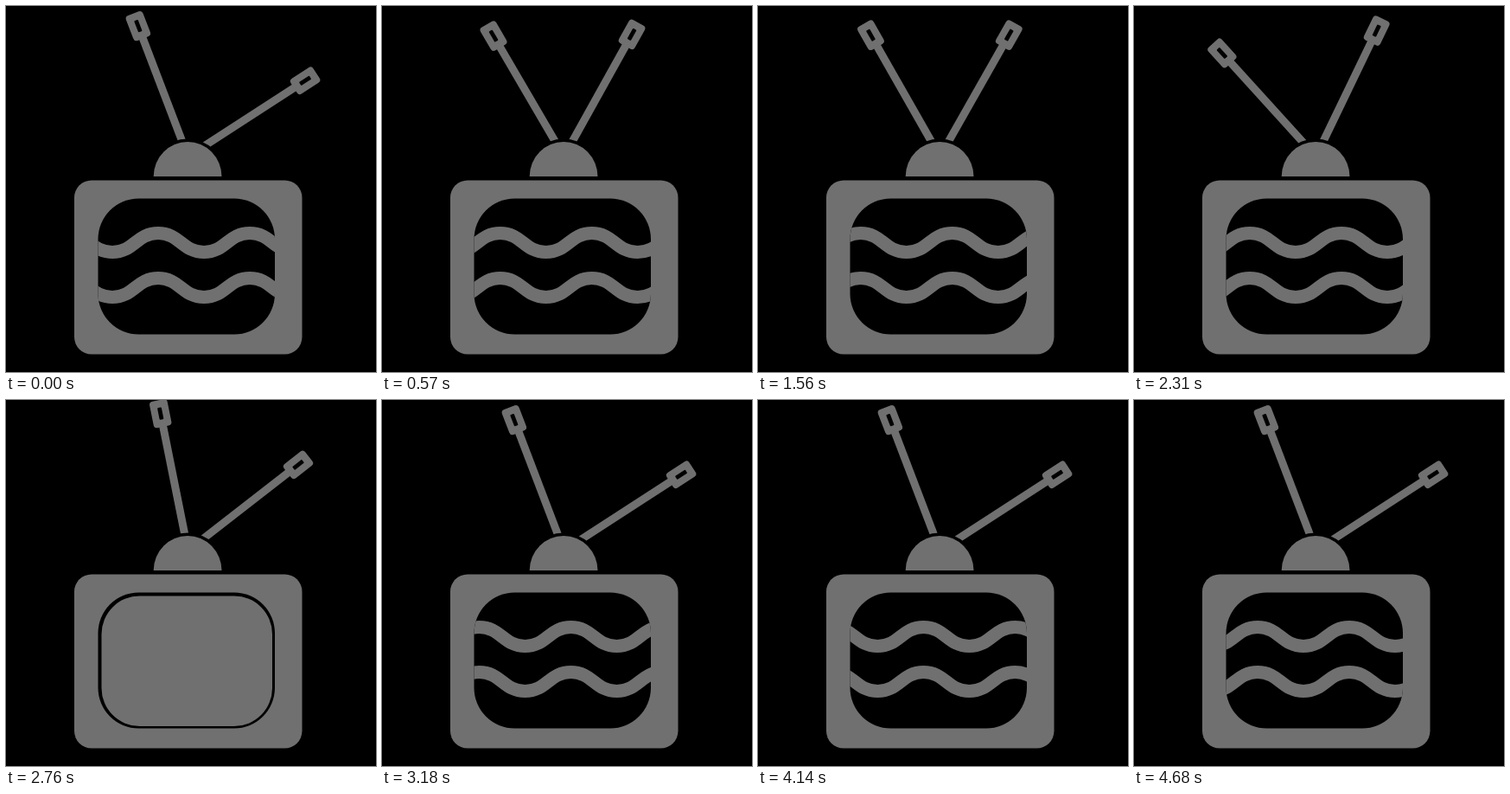
Write an HTML page that moves like this. It is 428x423 px and loops after 4710 ms.

```html
<!DOCTYPE html>
<html lang="en">
<head>
<meta charset="utf-8">
<title>Television</title>
<style>
html, body { margin: 0; width: 100%; height: 100%; overflow: hidden; background: #000; }
svg { display: block; width: 100vw; height: 100vh; }
</style>
</head>
<body>
<svg viewBox="0 0 428 423" fill="#707070">
  <defs>
    <clipPath id="glass"><rect x="106.5" y="222.5" width="204.5" height="157" rx="47"/></clipPath>
    <g id="rod">
      <rect x="-4.5" y="-150" width="9" height="150"/>
      <rect x="-10.5" y="-177" width="21" height="31" rx="4"/>
      <rect x="-2.4" y="-168.5" width="4.8" height="14" rx="1" fill="#000"/>
    </g>
  </defs>
  <rect width="428" height="423" fill="#000"/>
  <use id="left" href="#rod"/>
  <use id="right" href="#rod"/>
  <circle cx="210" cy="196.5" r="43" fill="#000"/>
  <path d="M170.7 197a39.4 40 0 0 1 78.8 0z"/>
  <rect x="79" y="197" width="263" height="20" fill="#000"/>
  <rect x="79" y="201.5" width="263.5" height="201" rx="20"/>
  <rect x="106.5" y="222.5" width="204.5" height="157" rx="47" fill="#000"/>
  <g clip-path="url(#glass)">
    <g id="waves" fill="none" stroke="#707070" stroke-width="15">
      <path id="wave"/>
      <use href="#wave" y="52"/>
    </g>
  </g>
  <rect id="fill" x="110.5" y="226.5" width="197.5" height="150.5" rx="44"/>
</svg>
<script>
const LOOP = 4710, HALF = 2340, STEP = 30;
const PERIOD = 106, SPEED = 0.303;
const FLASH = [270, 480];

// [time, angle] pairs, eased in between
const leftKeys = [[0, -20.9], [270, -59.5], [600, -29.7], [2175, -29.7],
                  [2475, -59.5], [2850, -3.8], [3180, -20.9], [LOOP, -20.9]];
const rightKeys = [[0, 57.1], [270, 5], [600, 29.6], [2175, 29.6],
                   [2475, 20.5], [2850, 57.1], [LOOP, 57.1]];

const el = id => document.getElementById(id);
const [left, right, waves, fill] = ['left', 'right', 'waves', 'fill'].map(el);

const ease = u => (1 - Math.cos(Math.PI * u)) / 2;

function valueAt(keys, t) {
  const i = keys.findIndex(k => k[0] > t);
  const [t0, a] = keys[i - 1], [t1, b] = keys[i];
  return a + (b - a) * ease((t - t0) / (t1 - t0));
}

function wavePath() {
  let d = 'M0 262.5';
  for (let i = 0; i < 5; i++) d += 'c25 0 28 22 53 22s28-22 53-22';
  return d;
}

function pose(rod, angle) {
  rod.setAttribute('transform', `translate(210.5 174) rotate(${angle})`);
}

function draw(ms) {
  const t = Math.floor((ms % LOOP) / STEP) * STEP;
  const local = t < HALF ? t : t - HALF;
  const shift = (176 + SPEED * local) % PERIOD;
  const flash = local >= FLASH[0] && local < FLASH[1];
  pose(left, valueAt(leftKeys, t));
  pose(right, valueAt(rightKeys, t));
  waves.setAttribute('transform', `translate(${shift - PERIOD} 0)`);
  fill.setAttribute('visibility', flash ? 'visible' : 'hidden');
  waves.setAttribute('visibility', flash ? 'hidden' : 'visible');
}

function tick() {
  draw(performance.now() - start);
  requestAnimationFrame(tick);
}

el('wave').setAttribute('d', wavePath());
const start = performance.now();
draw(0);
requestAnimationFrame(tick);
</script>
</body>
</html>
```
